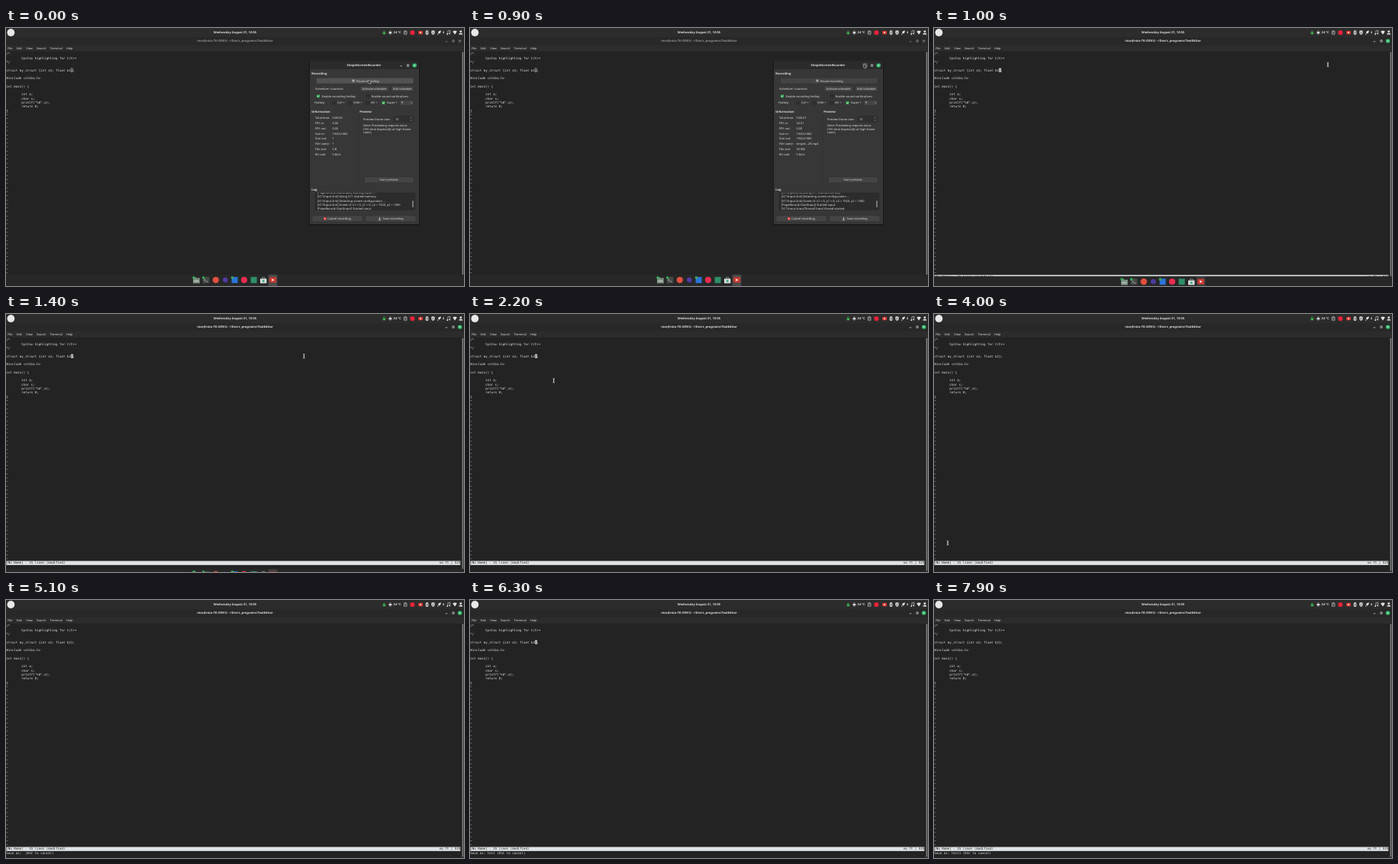
Write an HTML page that moves like this. It is 600 px wide and 338 px high and loops after 8 s.

```html
<!DOCTYPE html>
<html lang="en">
<head>
<meta charset="utf-8">
<title>Terminal editor</title>
<style>
  html, body { margin: 0; width: 100%; height: 100%; overflow: hidden; background: #232323; }
  svg { display: block; width: 600px; height: 338px; }
  text { font: 3.9px "Noto Sans", "Open Sans", sans-serif; fill: #dcdcdc; white-space: pre; text-rendering: geometricPrecision; }
  .b { font-weight: 700; font-size: 4px; }
  .m { font: 4.153px "DejaVu Sans Mono", "Liberation Mono", monospace; }
  .mid { text-anchor: middle; }
</style>
</head>
<body>
<svg id="stage" viewBox="0 0 600 338" xmlns="http://www.w3.org/2000/svg"></svg>
<script>
const LOOP = 8000, STEP = 100;
const COL = 2.5, ROW = 5.3125, LEFT = .3, TOP = 31.35;
const GREEN = '#2fb564';

// ---- drawing helpers (all return markup) ----
const rect = (x, y, w, h, fill, extra = '') =>
  `<rect x="${x}" y="${y}" width="${w}" height="${h}" fill="${fill}" ${extra}/>`;
const dot = (x, y, r, fill, extra = '') =>
  `<circle cx="${x}" cy="${y}" r="${r}" fill="${fill}" ${extra}/>`;
const line = (d, color = '#dcdcdc', w = .6, extra = '') =>
  `<path d="${d}" fill="none" stroke="${color}" stroke-width="${w}" ${extra}/>`;
const shape = (d, fill) => `<path d="${d}" fill="${fill}"/>`;
const safe = s => s.replace(/&/g, '&amp;').replace(/</g, '&lt;');
// y is the optical middle of the line
const text = (x, y, s, cls = '', extra = '') =>
  `<text x="${x}" y="${y + 1.4}" class="${cls}" ${extra}>${safe(s)}</text>`;
const mono = (col, row, s, fill = '#e2e2e2', id = '') =>
  `<text x="${LEFT + col * COL}" y="${TOP + row * ROW + 3.9}" class="m" style="fill:${fill}" id="${id}">${safe(s)}</text>`;
const group = (id, body) => `<g id="${id}">${body}</g>`;

const button = (x, y, w, h, id = '') =>
  rect(x, y, w, h, '#444444', `rx="1" stroke="#2a2a2a" stroke-width=".4" id="${id}"`);
const check = (x, y, on) => on
  ? rect(x - 2, y - 2, 4, 4, '#35a854', 'rx=".6"') + line(`M${x - 1.1} ${y}l.8 .9l1.5 -1.8`, '#fff', .6)
  : rect(x - 2, y - 2, 4, 4, '#303030', 'rx=".6" stroke="#252525" stroke-width=".4"');
const winButtons = (x, y, id) =>
  line(`M${x - 1.3} ${y + .8}h2.6`, '#e0e0e0', .7) +
  line(`M${x + 7.9} ${y - 1.2}h2.2v2.4h-2.2z`, '#e0e0e0', .7) +
  dot(x + 17.6, y, 2.8, GREEN, `id="${id}"`) +
  line(`M${x + 16.6} ${y - 1}l2 2m0 -2l-2 2`, '#fff', .6);

// ---- desktop panel ----
function panel() {
  const white = '#e4e4e4';
  return rect(0, 0, 600, 12, '#2c2c2c') +
    dot(6.4, 6, 4.9, '#e8e8e8') +
    text(300, 6, 'Wednesday August 21, 10:55', 'b mid') +
    rect(493.7, 5.4, 3.4, 2.8, '#3fae4c') + line('M494.4 5.4v-.8a1 1 0 0 1 2 0v.8', '#3fae4c') +
    dot(503.4, 6, 1.6, white) + dot(503.4, 6, 2.3, 'none', `stroke="${white}" stroke-width=".6" stroke-dasharray=".7 .7"`) +
    text(507.6, 6, '24 °C', 'b') +
    line('M521.4 4.2h3.6v4h-3.6zM522.4 3.6h1.6M522.2 6h2', white, .6) +
    dot(532.4, 6, 3.1, '#e5243b') +
    rect(540.2, 3.8, 5.8, 4.4, '#d8392f', 'rx=".8"') + shape('M542.2 4.8v2.4l2.2 -1.2z', '#fff') +
    rect(549.8, 3.1, 3.6, 5.8, white, 'rx="1.7"') + line('M550.6 4.9l2 2.1l-1 1v-4l1 1l-2 2.1', '#2c2c2c', .4) +
    shape('M559.5 3l2.3 .8v2.4q-.4 2 -2.3 2.9q-1.9 -.9 -2.3 -2.9v-2.4z', '#c8c8c8') + line('M558.4 6l.8 .9l1.5 -1.8', '#2c2c2c', .5) +
    shape('M570 3.2q-3 .3 -4.2 2.6l1.6 1.8q2.5 -1.4 2.6 -4.4zM565.6 7l1.2 1.2l-1.6 .6z', white) +
    text(571.8, 6, '4', 'b') +
    line('M578.8 8v-4l3 -.8v4', white, .6) + dot(578.2, 8, .9, white) + dot(581.2, 7.3, .9, white) +
    shape('M585.2 4.6q2.8 -2.2 5.6 0l-2.8 3.9z', white) +
    dot(595.8, 4.6, 1.4, white) + shape('M593.2 8.6q0 -2.2 2.6 -2.2t2.6 2.2z', white);
}

// ---- terminal window ----
function terminal() {
  const code = [
    '/*', '        Syntax highlighting for C/C++', '*/', '',
    'struct my_struct {int a1; float b2};', '', '#include <stdio.h>', '', 'int main() {', '',
    '        int a;', '        char s;', '        printf("%d",a);', '        return 0;', '}'
  ];
  while (code.length < 55) code.push('~');
  const menus = [[2.3, 'File'], [14, 'Edit'], [26.3, 'View'], [40, 'Search'], [57.8, 'Terminal'], [79, 'Help']];
  const x = LEFT + 34 * COL, y = TOP + 4 * ROW;
  return rect(0, 12, 600, 10.5, '#282828') + rect(0, 22.5, 600, 8.3, '#2c2c2c') +
    text(300, 17, 'nico@nico-TK-ORVU: ~/Dev/c_programs/TextEditor', 'b mid', 'id="title"') +
    group('buttons', winButtons(577, 17, 'close')) +
    menus.map(([mx, s]) => text(mx, 26.5, s)).join('') +
    rect(0, 30.8, 600, 307.2, '#232323') +
    code.map((s, r) => mono(0, r, s)).join('') +
    rect(x + .2, y + .2, COL - .4, ROW - .4, 'none', 'stroke="#d8d8d8" stroke-width=".4" id="hollow"') +
    group('caret', rect(x, y, COL, ROW, '#e6e6e6') + mono(34, 4, '}', '#232323')) +
    rect(LEFT, TOP + 55 * ROW, 238 * COL, ROW, '#dfe3e6') +
    mono(0, 55, '[No Name] - 15 lines (modified)', '#232323') +
    mono(227, 55, 'no ft | 515', '#232323') +
    mono(0, 56, '', '#e2e2e2', 'prompt') +
    rect(596.8, 30.8, 3.2, 307.2, '#2a2a2a') + rect(597.7, 31.6, 1.5, 305, '#858585', 'rx=".7"');
}

// ---- bottom dock ----
function dock() {
  const badge = x => dot(x, 327, 1.8, '#35a854');
  return rect(0, 323, 600, 15.5, '#272727') +
    rect(343.8, 323.2, 11.6, 14.8, '#4a4a4a', 'id="active"') +
    shape('M245 326.4h3.4l1 1.2h4.4v7h-8.8z', '#7f9284') + line('M246.5 331.6h5.8', '#e4e4e4', .9) +
    rect(257.6, 326.2, 8.8, 8.2, '#454b48', 'rx=".8"') + line('M259.6 329l1.4 1.2l-1.4 1.2M262 332h2', '#fff', .6) +
    dot(274.8, 330.1, 4.2, '#e0503f') +
    dot(287.3, 330.1, 3.3, '#4d3aa0') +
    rect(295.6, 326.2, 8, 8, '#2b74d8') +
    dot(312, 330.1, 4.1, '#e62e50') +
    rect(320.6, 326.2, 8, 8, '#2f8f68') +
    shape('M333 328.4h8.4v6h-8.4z', '#d9dedc') + line('M335.4 328.4v-1.6h3.6v1.6', '#9fb5ad', .7) + rect(335.8, 330.2, 2.8, 2.6, '#36a488') +
    rect(345.3, 326.6, 8.6, 7, '#cf3b32', 'rx=".8"') + shape('M348.4 328.4v3.4l2.9 -1.7z', '#fff') +
    badge(246) + badge(258.6) + badge(296.4);
}

// ---- recorder dialog ----
const LOG = [
  '[PageRecord::StartInput] Starting input ...',
  '[X11Input::Init] Using X11 shared memory.',
  '[X11Input::Init] Detecting screen configuration ...',
  '[X11Input::Init] Screen 0: x1 = 0, y1 = 0, x2 = 1920, y2 = 1080',
  '[PageRecord::StartInput] Started input.',
  '[X11Input::InputThread] Input thread started.'
];
const INFO = [
  ['Total time:', '0:00:00', '0:00:01'], ['FPS in:', '0.00', '33.51'], ['FPS out:', '0.00', '0.00'],
  ['Size in:', '1920x1080', '1920x1080'], ['Size out:', '?', '1920x1080'],
  ['File name:', '?', 'simple...29.mp4'], ['File size:', '0 B', '30 KiB'], ['Bit rate:', '0 bit/s', '0 bit/s']
];
const infoValues = n => INFO.map((r, i) => text(427.5, 117.5 + i * 6.87, r[1 + n])).join('');
const logLines = first => LOG.slice(first, first + 5).map((s, i) => text(408, 215.8 + i * 5.2, s)).join('');

function dialog() {
  return rect(397, 43, 145, 215.5, '#000', 'rx="2" opacity=".3"') +
    rect(398, 43.5, 143, 213.5, '#373737', 'rx="1.5"') +
    rect(398, 43.5, 143, 10.5, '#2b2b2b', 'rx="1.5"') +
    text(469, 49, 'SimpleScreenRecorder', 'b mid') +
    dot(517.6, 49, 3.2, '#5c5c5c', 'id="minHover"') + winButtons(517.6, 49, 'dlgClose') +
    text(400.3, 60, 'Recording', 'b') +
    button(406.5, 65.3, 127.5, 7.7, 'pause') +
    rect(453.6, 67.6, 1, 3, '#ddd') + rect(455.4, 67.6, 1, 3, '#ddd') + text(459, 69.1, 'Pause recording') +
    text(405, 79.5, 'Scheduler: (inactive)') +
    button(463.8, 76, 37.4, 7.3) + text(482.5, 79.5, 'Activate schedule', 'mid') +
    button(504.6, 76, 29.4, 7.3) + text(519.3, 79.5, 'Edit schedule', 'mid') +
    check(409, 89.3, true) + text(413.5, 89.2, 'Enable recording hotkey') +
    check(474.2, 89.3, false) + text(478.8, 89.2, 'Enable sound notifications') +
    text(404, 98, 'Hotkey:') +
    [[429.8, 'Ctrl +'], [451, 'Shift +'], [473.8, 'Alt +'], [494.5, 'Super +']]
      .map(([x, s], i) => check(x, 98, i === 3) + text(x + 4.3, 98, s)).join('') +
    button(515.5, 94.5, 18.5, 7) + text(518, 98, 'R') + line('M530 97.3l1.2 1.2l1.2 -1.2', '#ccc', .5) +
    text(400.3, 110, 'Information', 'b') + text(463.3, 110, 'Preview', 'b') +
    INFO.map((r, i) => text(405, 117.5 + i * 6.87, r[0])).join('') +
    group('info0', infoValues(0)) + group('info1', infoValues(1)) +
    line('M462 107.5V207', '#303030', .4) +
    text(468, 119.2, 'Preview frame rate:') +
    rect(507.5, 115.5, 26.5, 7.5, '#2f2f2f', 'rx="1" stroke="#272727" stroke-width=".4"') + text(510, 119.2, '10') +
    line('M529.6 118.2l1.2 -1.2l1.2 1.2M529.6 120.4l1.2 1.2l1.2 -1.2', '#aaa', .5) +
    ['Note: Previewing requires extra', 'CPU time (especially at high frame', 'rates).']
      .map((s, i) => text(468, 127.8 + i * 4.6, s)).join('') +
    button(469.3, 195, 64.7, 7.7) + text(501.6, 198.8, 'Start preview', 'mid') +
    text(400.3, 212, 'Log', 'b') +
    rect(405, 216, 131, 22.4, '#2c2c2c', 'stroke="#262626" stroke-width=".4"') +
    `<clipPath id="logBox"><rect x="405" y="216" width="127" height="22"/></clipPath>` +
    `<g clip-path="url(#logBox)">${group('log0', logLines(0))}${group('log1', logLines(1))}</g>` +
    rect(532.2, 226, 1.6, 9, '#8a8a8a', 'rx=".8"') +
    button(401, 245.8, 66.3, 8) + rect(416, 248, 3.6, 3.6, '#d93a35', 'rx=".5"') +
    line('M417 249l1.6 1.6m0 -1.6l-1.6 1.6', '#fff', .5) + text(421.2, 249.8, 'Cancel recording') +
    button(471, 245.8, 66, 8) + line('M489.5 247.8v2.6m-1.2 -1l1.2 1.2l1.2 -1.2M487.8 251.8h3.4', '#ddd', .7) +
    text(493.6, 249.8, 'Save recording');
}

function pointers() {
  const bar = 'M-1.3 -2.8q1.3 0 1.3 .8v4q0 .8 -1.3 .8M1.3 -2.8q-1.3 0 -1.3 .8v4q0 .8 1.3 .8';
  return group('arrow', `<path d="M-1 -2v5l1.2 -1l.8 1.8l.8 -.4l-.8 -1.7h1.6z" fill="#111" stroke="#eee" stroke-width=".4"/>`) +
    group('ibeam', line(bar, '#111', 1.3) + line(bar, '#f0f0f0', .7));
}

document.getElementById('stage').innerHTML =
  rect(0, 0, 600, 338, '#232323') + group('term', terminal()) + group('dock', dock()) +
  panel() + group('dialog', dialog()) + pointers();

// ---- timeline ----
const PATH = [
  [0, 476, 70], [200, 478, 69], [400, 490, 62], [600, 508, 53], [800, 517, 49.5], [900, 517, 49.5], [1000, 516, 48],
  [1300, 430, 54], [1600, 311, 58], [1700, 311, 58], [1800, 250, 63], [1900, 150, 80], [2000, 109.7, 87.3],
  [2200, 109.7, 87.3], [2300, 75, 145], [2400, 28.5, 217], [2600, 28.5, 217], [2700, 24, 235], [2900, 9, 290],
  [3000, 13, 318], [3200, 39, 333], [3500, 45, 327.5], [3800, 28, 316], [4000, 18, 300], [LOOP, 18, 300]
];
const BLINK = [1000, 1600, 2200, 2800, 3400, 4000, 4400, 5100, 5700, 6900, 7300, 7900];
const KEYS = [5700, 5900, 6100, 6300, 7300];
const WORD = 'test1';

const el = {};
document.querySelectorAll('#stage [id]').forEach(n => { if (n.id) el[n.id] = n; });
const show = (id, on) => { el[id].style.display = on ? '' : 'none'; };
const passed = (times, t) => times.filter(k => k <= t).length;

function pointerAt(t) {
  const i = PATH.findIndex(p => p[0] > t);
  const [t0, x0, y0] = PATH[i - 1], [t1, x1, y1] = PATH[i];
  const k = (t - t0) / (t1 - t0);
  return [x0 + (x1 - x0) * k, y0 + (y1 - y0) * k];
}

function draw(t) {
  const recording = t < 1000;
  show('dialog', recording);
  show('hollow', recording);
  show('caret', passed(BLINK, t) % 2 === 1);
  show('log0', t < 100);
  show('log1', t >= 100);
  show('info0', t < 600);
  show('info1', t >= 600);
  show('minHover', t >= 800);
  el.pause.setAttribute('fill', t < 400 ? '#525252' : '#444444');
  el.title.style.fill = recording ? '#929292' : '#dcdcdc';
  el.buttons.setAttribute('opacity', recording ? .6 : 1);
  el.close.setAttribute('fill', recording ? '#444444' : GREEN);

  const slide = Math.min(1, Math.max(0, (t - 900) / 700));
  el.dock.setAttribute('transform', `translate(0 ${15.2 * slide})`);
  show('dock', slide < 1);
  el.active.setAttribute('opacity', recording ? 1 : .6);

  const typed = WORD.slice(0, passed(KEYS, t));
  el.prompt.textContent = t < 4400 ? '' : `Save as: ${typed} (ESC to cancel)`;

  const [x, y] = pointerAt(t);
  for (const id of ['arrow', 'ibeam']) el[id].setAttribute('transform', `translate(${x} ${y})`);
  show('arrow', recording);
  show('ibeam', !recording && t < 4400);
}

const start = performance.now();
function tick() {
  const t = (performance.now() - start) % LOOP;
  draw(Math.floor(t / STEP) * STEP);
  requestAnimationFrame(tick);
}
tick();
</script>
</body>
</html>
```
